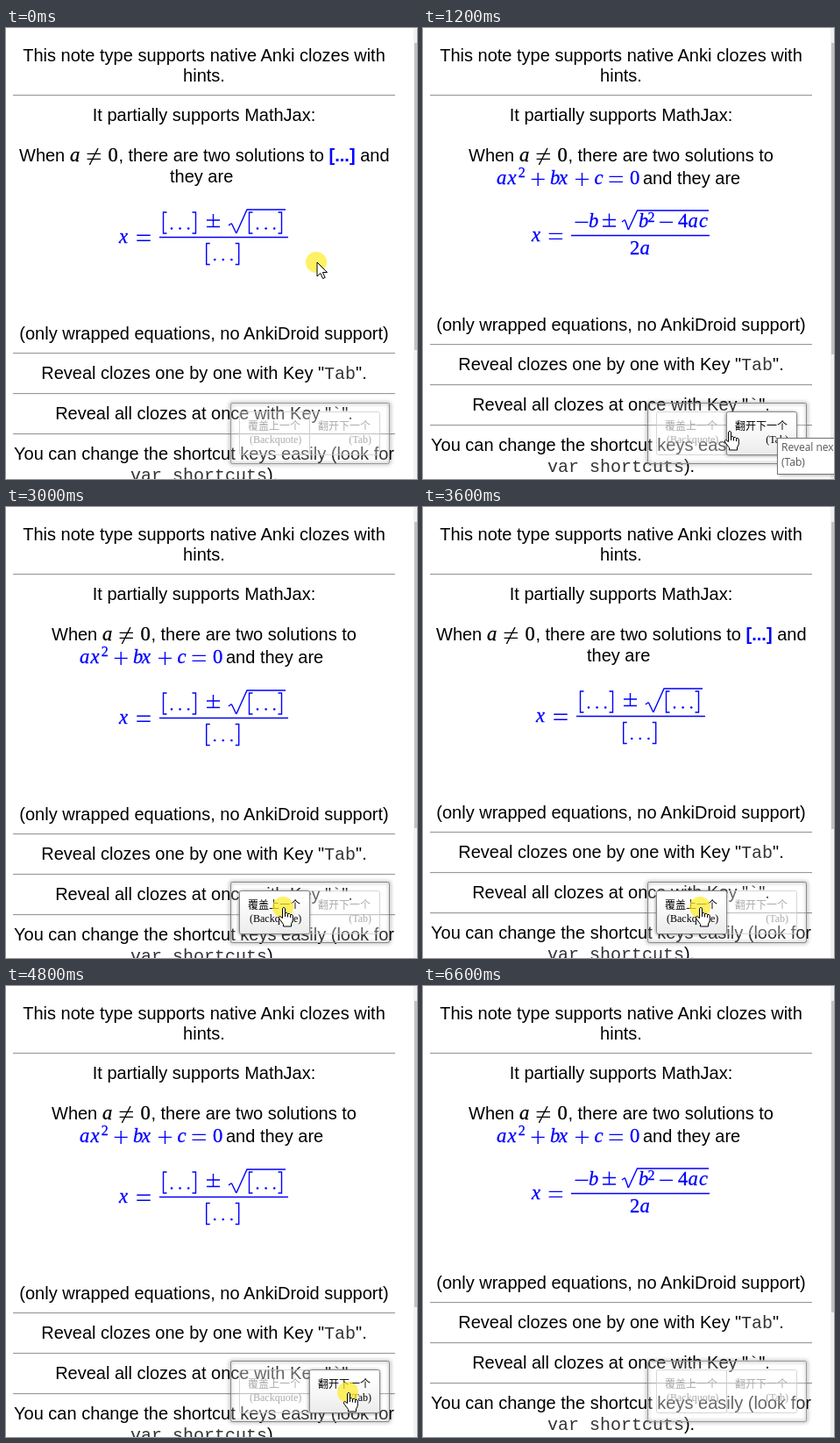
Recreate the animation shown at these times as an HTML page. Size 469 by 514 pixels, loop 7200 ms.

```html
<!DOCTYPE html>
<html lang="en">
<head>
<meta charset="utf-8">
<title>Cloze note</title>
<style>
html, body { margin: 0; width: 100%; height: 100%; overflow: hidden; background: #fff; }
svg { display: block; width: 469px; height: 514px; }
text { white-space: pre; }
.t { font: 20px "Liberation Sans", Arial, sans-serif; }
.mono { font: 20px "Liberation Mono", "Courier New", monospace; fill: #333; }
.math { font: 22.6px "Liberation Serif", "Times New Roman", serif; stroke-width: .3; }
.it { font-style: italic; }
.sup { font-size: 16px; }
.cjk { font: 12px "Noto Sans CJK SC", "Noto Sans CJK", sans-serif; }
.key { font: 12px "Liberation Serif", "Times New Roman", serif; }
.tip { font: 12px "Open Sans", sans-serif; fill: #575757; }
.line { fill: none; stroke-width: 1.4; }
</style>
</head>
<body>
<svg id="stage" viewBox="0 0 469 514">
  <defs>
    <linearGradient id="face" x2="0" y2="1">
      <stop offset=".2" stop-color="#fff"/><stop offset="1" stop-color="#ebebeb"/>
    </linearGradient>
    <filter id="soft" x="-20%" y="-20%" width="140%" height="140%">
      <feGaussianBlur stdDeviation="2"/>
    </filter>
  </defs>
  <g id="page"></g>
  <g id="panel"></g>
  <g id="pointer"></g>
</svg>
<script>
const STEP = 600;
const BLUE = "#00f";
const $ = id => document.getElementById(id);

// shown: revealed clozes, hover: active button, at: pointer hotspot
const steps = [
  { shown: 0, at: [355, 267], glow: true, arrow: true },
  { shown: 2, hover: "right", at: [404, 447] },
  { shown: 2, hover: "right", at: [350, 459], tip: [404, 467, 110, "Reveal next cloze", "(Tab)"] },
  { shown: 2, hover: "left", at: [284, 440], tip: [284, 462, 168, "Cover the previous cloze", "(Backquote)"] },
  { shown: 2, hover: "left", at: [317, 456], glow: true },
  { shown: 1, hover: "left", at: [317, 456], glow: true },
  { shown: 0, hover: "left", at: [317, 456], glow: true },
  { shown: 0, hover: "right", at: [391, 463], glow: true },
  { shown: 1, hover: "right", at: [391, 463], glow: true },
  { shown: 2, hover: "right", at: [391, 459] },
  { shown: 2, hover: "right", at: [370, 464] },
  { shown: 2 }
];

// vertical layout and scrollbar end for each number of revealed clozes
const layouts = [
  { rule: 370, thumb: 367, dy: 0 },
  { rule: 372, thumb: 366, dy: 2 },
  { rule: 360, thumb: 372, dy: 0 }
];

const text = (x, y, s, cls = "t", more = "") =>
  `<text x="${x}" y="${y}" class="${cls}" ${more}>${s}</text>`;
const mid = (y, s) => text(226, y, s, "t", 'text-anchor="middle"');
const mono = s => `<tspan class="mono">${s}</tspan>`;
const rect = (x, y, w, h, more) =>
  `<rect x="${x}" y="${y}" width="${w}" height="${h}" ${more}/>`;
const path = (d, cls = "line", more = "") => `<path d="${d}" class="${cls}" ${more}/>`;
const rule = y => rect(8, y, 436, 1, 'fill="#9a9a9a"') + rect(8, y + 1, 436, 1, 'fill="#eee"');

// math pieces; x is the left edge, y the baseline
const glyph = (s, x, y) => text(x, y, s, /[a-z]/.test(s) ? "math it" : "math");
const square = (x, y) => text(x, y - 8, "2", "math sup");
const minus = (x, y) => path(`M${x} ${y - 5.6}h15`);
const equals = (x, y) => path(`M${x} ${y - 8.6}h15.4m0 6h-15.4`);
const plus = (x, y) => path(`M${x} ${y - 5.6}h15m-7.5-7.5v15`);
const plusMinus = (x, y) => path(`M${x} ${y - 8}h15m-7.5-7v14M${x} ${y - .5}h15`);
const notEqual = (x, y) => equals(x, y) + path(`M${x + 12.4} ${y - 15}l-9.6 19`);
const ink = (color, s) => `<g fill="${color}" stroke="${color}">${s}</g>`;

function hole(x, y) {
  const dots = [0, 1, 2].map(i =>
    `<circle cx="${x + 11.5 + i * 9.6}" cy="${y + 7}" r="1.3" stroke="none"/>`).join("");
  return path(`M${x + 6} ${y - 11.5}h-4v24h4M${x + 35} ${y - 11.5}h4v24h-4`) + dots;
}

function root(x, top, bottom, w, end) {
  const low = bottom - 11;
  return path(`M${x} ${low + 2}l3.5-2.5`) +
    path(`M${x + 3.5} ${low}L${x + w * .42} ${bottom}`, "line", 'stroke-width="2"') +
    path(`M${x + w * .42} ${bottom}L${x + w} ${top}H${end}`);
}

const hiddenFormula = dy => `<g transform="translate(0 ${dy})">` +
  glyph("x", 129, 245) + equals(149.3, 244.8) +
  hole(177.5, 221.5) + plusMinus(229, 227) + root(254, 207, 234, 21, 319) + hole(275.5, 221.5) +
  path("M175 238.5H322") + hole(226.7, 257) + "</g>";

const shownFormula = () =>
  glyph("x", 124, 243) + equals(143.7, 243) +
  minus(173.5, 227) + glyph("b", 189, 227) + plusMinus(205, 226.5) +
  root(227, 208, 230, 17.5, 326) + glyph("b", 246, 227) + square(256.5, 228.5) +
  minus(270, 227) + glyph("4", 291, 227) + glyph("a", 302.5, 227) + glyph("c", 315, 227) +
  path("M169 236.5H327") + glyph("2", 236, 258) + glyph("a", 247.5, 258);

const equation = () =>
  glyph("a", 84, 178) + glyph("x", 96.5, 178) + square(108.8, 178) + plus(123.7, 178) +
  glyph("b", 145, 178) + glyph("x", 155, 178) + plus(174, 178) +
  glyph("c", 195.5, 178) + equals(212.5, 178) + glyph("0", 236, 178);

function sentence(open) {
  const x = open ? 52 : 15;
  const start = text(x, 152, "When") +
    ink("#000", glyph("a", x + 58, 152) + notEqual(x + 77.6, 152) + glyph("0", x + 101.5, 152)) +
    text(x + 113.4, 152, ", there are two solutions to");
  return start + (open
    ? ink(BLUE, equation()) + text(251, 178, "and they are")
    : text(368.6, 152, "[...]", "t", `font-weight="bold" style="font-weight:bold" fill="${BLUE}"`) +
      text(404.2, 152, "and") + text(187, 176, "they are"));
}

function drawPage(shown) {
  const { rule: r, thumb, dy } = layouts[shown];
  $("page").innerHTML =
    mid(38, "This note type supports native Anki clozes with") + mid(61, "hints.") + rule(76) +
    mid(106, "It partially supports MathJax:") +
    sentence(shown > 0) +
    ink(BLUE, shown > 1 ? shownFormula() : hiddenFormula(dy)) +
    mid(r - 15, "(only wrapped equations, no AnkiDroid support)") + rule(r) +
    mid(r + 30, `Reveal clozes one by one with Key "${mono("Tab")}".`) + rule(r + 46) +
    mid(r + 76, `Reveal all clozes at once with Key "${mono("`")}".`) + rule(r + 92) +
    mid(r + 122, "You can change the shortcut keys easily (look for") +
    mid(r + 146, `${mono("var shortcuts")}).`) +
    rect(465, 0, 4, 514, 'fill="#f1f1f1"') + rect(466, 17, 3, thumb - 17, 'fill="#c1c1c1"');
}

function button(x, label, key, keyX, anchor, on) {
  const body = on
    ? rect(x, 438, 80, 49, 'rx="2" fill="#000" opacity=".55" filter="url(#soft)"') +
      rect(x + .5, 437.5, 80, 49, 'rx="2" fill="url(#face)" stroke="#888"')
    : rect(x + .5, 437.5, 80, 49, 'rx="2" fill="#fff" fill-opacity=".25" stroke="#ccc" stroke-opacity=".8"');
  return body + `<g fill="${on ? "#000" : "#aaa"}">` + text(x + 10, 458, label, "cjk") +
    text(keyX, 473, key, "key", `text-anchor="${anchor}"`) + "</g>";
}

function drawPanel(hover) {
  const left = button(266, "覆盖上一个", "(Backquote)", 278, "start", hover === "left");
  const right = button(346, "翻开下一个", "(Tab)", 417, "end", hover === "right");
  $("panel").innerHTML =
    rect(256, 427.5, 182, 69, 'rx="2" fill="none" stroke="#000" stroke-width="2" opacity=".4" filter="url(#soft)"') +
    rect(256.5, 427.5, 181, 69, `rx="2" fill="#fff" fill-opacity=".2" stroke="${hover ? "#888" : "#999"}"`) +
    (hover === "left" ? right + left : left + right);
}

function tooltip([x, y, w, first, second]) {
  return rect(x + 2, y + 2, w, 41, 'fill="#000" opacity=".3" filter="url(#soft)"') +
    rect(x + .5, y + .5, w, 41, 'fill="#fff" stroke="#767676"') +
    text(x + 5, y + 15, first, "tip") + text(x + 5, y + 32, second, "tip");
}

const arrowShape = "M0 0V16L3.8 12.5 6.6 18.6 9.2 17.4 6.4 11.5H11.5Z";
const handShape = "M-1.5 1.5Q0-1 1.5 1.5V7Q3.4 5.6 4.5 7.6 6.5 6.5 7.5 8.6 9.8 7.6 10.3 10" +
  "V15Q10 17 8.5 19V22H-.5V19.5L-5.3 13Q-6.2 10.6-4.3 10.4L-1.5 12.6Z";

function drawPointer({ at, glow, arrow, tip }) {
  if (!at) return $("pointer").innerHTML = "";
  const [x, y] = at;
  const marks = arrow ? "" : path("M1.5 7v4M4.5 8v3.5M7.5 9v3", "line", 'stroke="#000" style="stroke-width:1"');
  $("pointer").innerHTML = (tip ? tooltip(tip) : "") +
    (glow ? `<circle cx="${x - 1}" cy="${y}" r="12" fill="#ffeb28" opacity=".72"/>` : "") +
    `<g transform="translate(${x} ${y})">` +
    path(arrow ? arrowShape : handShape, "", 'fill="#fff" stroke="#000" stroke-linejoin="round"') +
    marks + "</g>";
}

let current = -1;
function draw(now) {
  const i = Math.floor(now / STEP) % steps.length;
  if (i !== current) {
    current = i;
    drawPage(steps[i].shown);
    drawPanel(steps[i].hover);
    drawPointer(steps[i]);
  }
}

const begin = performance.now();
function tick() {
  draw(performance.now() - begin);
  requestAnimationFrame(tick);
}
tick();
</script>
</body>
</html>
```
